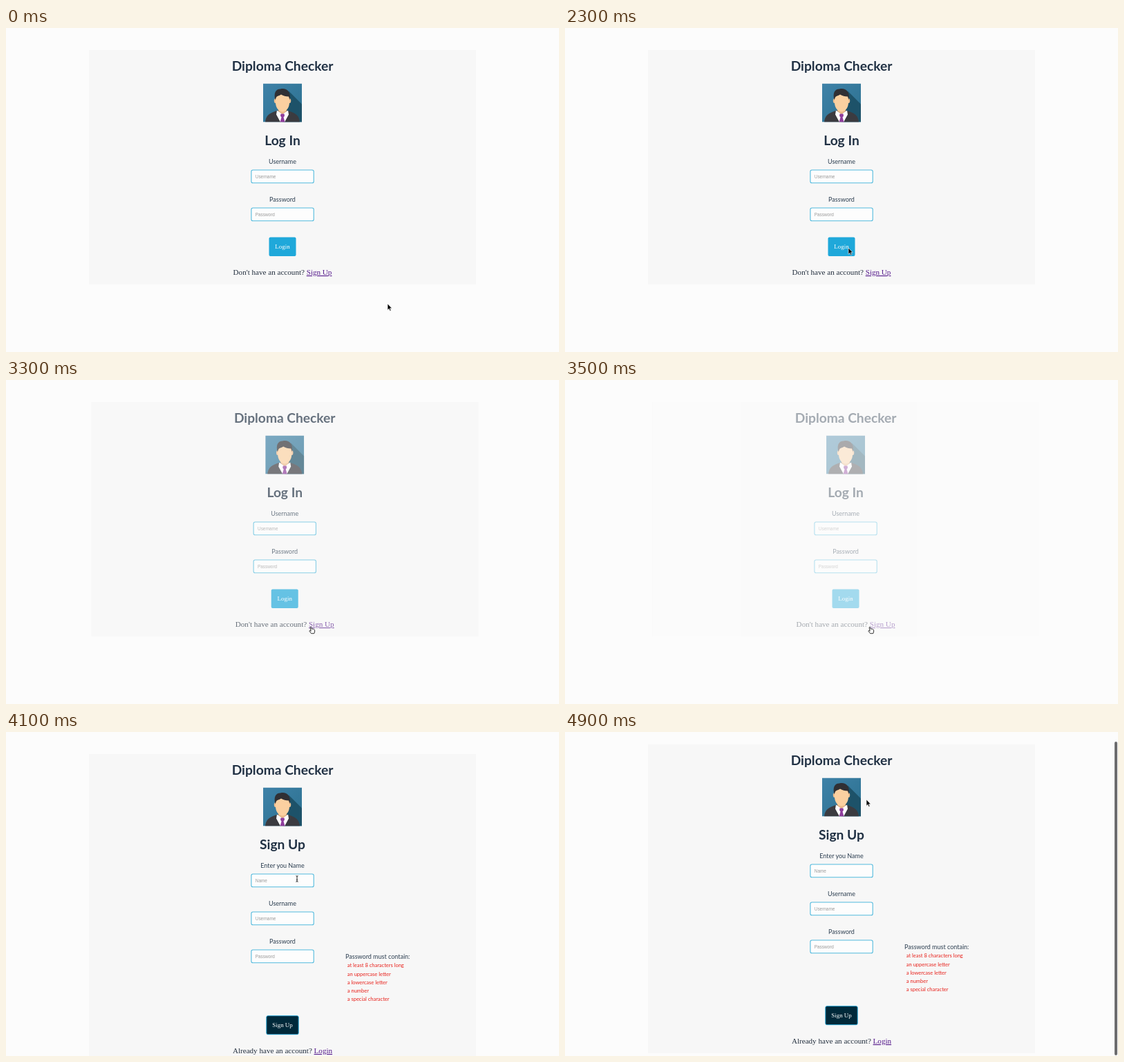
Animation of 800x470 px, one loop 5 s. Source, as an HTML page:

```html
<!DOCTYPE html>
<html lang="en">
<head>
<meta charset="utf-8">
<title>Diploma Checker</title>
<style>
  html, body { margin: 0; width: 100%; height: 100%; overflow: hidden; background: #fcfcfc; }
  svg { display: block; width: 800px; height: 470px; }
  text { font-family: Lato, "Open Sans", sans-serif; fill: #2c3e50; white-space: pre; }
  .mid { text-anchor: middle; }
  .head { font-size: 19.2px; font-weight: 700; fill: #213144; }
  .label { font-size: 9px; }
  .hint { font: 6.4px "Liberation Sans", Arial, sans-serif; fill: #9a9a9a; }
  .rule { font-size: 7.5px; fill: #e8221c; }
  .foot { font: 11.1px "Liberation Serif", Times, serif; fill: #232f3e; }
  .btn { font: 8.95px "Liberation Serif", Times, serif; fill: #fff; }
  .link { fill: #551a8b; text-decoration: underline; }
</style>
</head>
<body>
<svg viewBox="0 0 800 470">
  <defs>
    <linearGradient id="sky" x1="0" y1="0" x2="1" y2="1">
      <stop offset="0" stop-color="#3f82a8"/>
      <stop offset="1" stop-color="#2b708f"/>
    </linearGradient>
    <clipPath id="frame"><rect width="56" height="56"/></clipPath>
    <g id="avatar" clip-path="url(#frame)">
      <rect width="56" height="56" fill="url(#sky)"/>
      <path d="M37 11 56 30V56H28Z" fill="#1d5269"/>
      <path d="M3 56C4 46 9 43 21 39H35C47 43 52 46 53 56Z" fill="#3b3b40"/>
      <path d="M20 39 28 44 36 39 37 45 31 56H25L19 45Z" fill="#fff"/>
      <path d="M22 33H34V40L28 45 22 40Z" fill="#eab988"/>
      <path d="M25.500 44H30.500L31 47 29.500 49 31.500 56H24.500L26.500 49 25 47Z" fill="#8f3d9c"/>
      <ellipse cx="17.800" cy="25" rx="2" ry="3.500" fill="#f1c192"/>
      <ellipse cx="38.200" cy="25" rx="2" ry="3.500" fill="#f1c192"/>
      <path d="M18 19C18 10 38 10 38 19V28C38 35 33 41 28 41S18 35 18 28Z" fill="#fbd0a0"/>
      <path d="M17.500 24C15 14 18 8 25 8 33 6 41 11 38.500 24L37 19C33 19 29 18 26 16 23 18 20 18 19 20Z" fill="#303034"/>
    </g>
  </defs>
  <g id="view"><g id="login"></g><g id="signup"></g></g>
  <rect id="bar" x="795" width="4" height="455" rx="2" fill="#6c6c6e"/>
  <g id="mouse">
    <path id="arrow" d="M0 0V9.200L2.100 7.300 3.500 10.400 5 9.700 3.600 6.700H6.300Z" fill="#000" stroke="#fff" stroke-width=".6"/>
    <path id="hand" d="M-.9 1.200C-.9 0 .6 0 .8 1.200L1.300 3.300C2 2.800 2.700 3 2.900 3.500 3.500 3.100 4.200 3.400 4.400 4 5.200 3.800 5.600 4.300 5.600 5.200V7L4.800 9.700H.6L-1.800 6.700C-2.600 5.600-1.400 5-.5 5.900L.2 6.300Z"
      fill="#fff" stroke="#111" stroke-width=".85"/>
    <path id="beam" d="M-1.600-4.300Q0-4.300 0-3.300 0-4.300 1.600-4.300M0-3.500V3.500M-1.600 4.300Q0 4.300 0 3.300 0 4.300 1.600 4.300M-.8 1.300H.8"
      fill="none" stroke="#111" stroke-width=".9"/>
  </g>
</svg>
<script>
const LOOP = 5000, STEP = 100;
const $ = id => document.getElementById(id);

const txt = (cls, x, y, s) => `<text class="${cls}" x="${x}" y="${y}">${s}</text>`;
const box = (x, y, w, h, r, paint) => `<rect x="${x}" y="${y}" width="${w}" height="${h}" rx="${r}" ${paint}/>`;
const field = (y, label, hint) =>
  txt('label mid', 400, y, label) +
  box(354.9, y + 9, 90.3, 18.7, 2.3, 'fill="#fdfdfd" stroke="#52badd" stroke-width="1.1"') +
  txt('hint', 360.8, y + 20.8, hint);
const foot = (y, ask, link) =>
  txt('foot mid', 400, y, `${ask} <tspan class="link">${link}</tspan>`);
const header = (height, title) =>
  box(120, 32, 560, height, 0, 'fill="#f7f7f7"') +
  txt('head mid', 400, 62.3, 'Diploma Checker') +
  '<use href="#avatar" x="372" y="80.500"/>' +
  txt('head mid', 400, 169.6, title);

$('login').innerHTML = header(340, 'Log In') +
  field(197, 'Username', 'Username') +
  field(252, 'Password', 'Password') +
  box(380.5, 303.5, 39, 27.5, 2, 'fill="#1fa8da"') +
  txt('btn mid', 400, 320.3, 'Login') +
  foot(358, "Don't have an account?", 'Sign Up');

const rules = ['at least 8 characters long', 'an uppercase letter',
  'a lowercase letter', 'a number', 'a special character'];
$('signup').innerHTML = header(448, 'Sign Up') +
  field(197, 'Enter you Name', 'Name') +
  field(252, 'Username', 'Username') +
  field(307, 'Password', 'Password') +
  txt('label', 491, 329, 'Password must contain:') +
  rules.map((s, i) => txt('rule', 493.8, 341.4 + i * 12.25, s)).join('') +
  box(376.8, 411.7, 46.4, 27, 2, 'fill="#00293a" stroke="#1fa8da" stroke-width=".9"') +
  txt('btn mid', 400, 428.2, 'Sign Up') +
  foot(466, 'Already have an account?', 'Login');

// time, x, y of the pointer tip
const path = [
  [0, 552, 400], [500, 552, 400], [800, 550, 400], [1100, 544, 399],
  [1200, 466, 286], [1300, 392, 152], [1400, 392, 152], [1500, 300, 102],
  [1600, 246, 180], [1700, 280, 300], [1800, 400, 348], [1900, 508, 290],
  [2000, 446, 341], [2100, 425, 258], [2200, 425, 258], [2300, 410, 319],
  [2500, 428, 342], [2800, 441, 358], [3800, 441, 358], [3900, 438, 340],
  [4000, 428, 265], [4100, 421, 213], [4200, 430, 140], [4300, 436, 98], [LOOP, 436, 98]
];

function pointAt(t) {
  const i = path.findIndex(p => p[0] > t);
  const [a, b] = [path[i - 1], path[i]];
  const k = (t - a[0]) / (b[0] - a[0]);
  return [a[1] + (b[1] - a[1]) * k, a[2] + (b[2] - a[2]) * k];
}

function bezier(x1, y1, x2, y2) {
  const at = (a, b, s) => 3 * (1 - s) * (1 - s) * s * a + 3 * (1 - s) * s * s * b + s * s * s;
  return x => {
    if (x <= 0 || x >= 1) return x <= 0 ? 0 : 1;
    let lo = 0, hi = 1;
    for (let i = 0; i < 24; i++) {
      const s = (lo + hi) / 2;
      if (at(x1, x2, s) < x) lo = s; else hi = s;
    }
    return at(y1, y2, lo);
  };
}
const leave = bezier(1, .5, .8, 1), enter = bezier(.25, .1, .25, 1);

// hidden: 0 is in place, 1 is faded out and slid 10px right
function slide(el, hidden) {
  el.setAttribute('opacity', 1 - hidden);
  el.setAttribute('transform', `translate(${10 * hidden} 0)`);
}
const show = (el, on) => el.setAttribute('visibility', on ? 'visible' : 'hidden');

function draw(t) {
  slide($('login'), leave((t - 2900) / 800));
  slide($('signup'), 1 - enter((t - 3800) / 300));

  const k = Math.min(1, Math.max(0, (t - 4400) / 500));
  const scroll = 14 * (1 - (1 - k) ** 2);
  $('view').setAttribute('transform', `translate(0 ${-scroll})`);
  $('bar').setAttribute('y', scroll);
  show($('bar'), t >= 4500);

  const [x, y] = pointAt(t);
  $('mouse').setAttribute('transform', `translate(${x} ${y})`);
  const hand = t >= 2700 && t < 3900;
  const beam = t >= 4100 && t < 4200;
  show($('hand'), hand);
  show($('beam'), beam);
  show($('arrow'), !hand && !beam);
}

const start = performance.now();
function tick() {
  const t = Math.max(0, performance.now() - start) % LOOP;
  draw(Math.floor(t / STEP) * STEP);
  requestAnimationFrame(tick);
}
tick();
</script>
</body>
</html>
```
